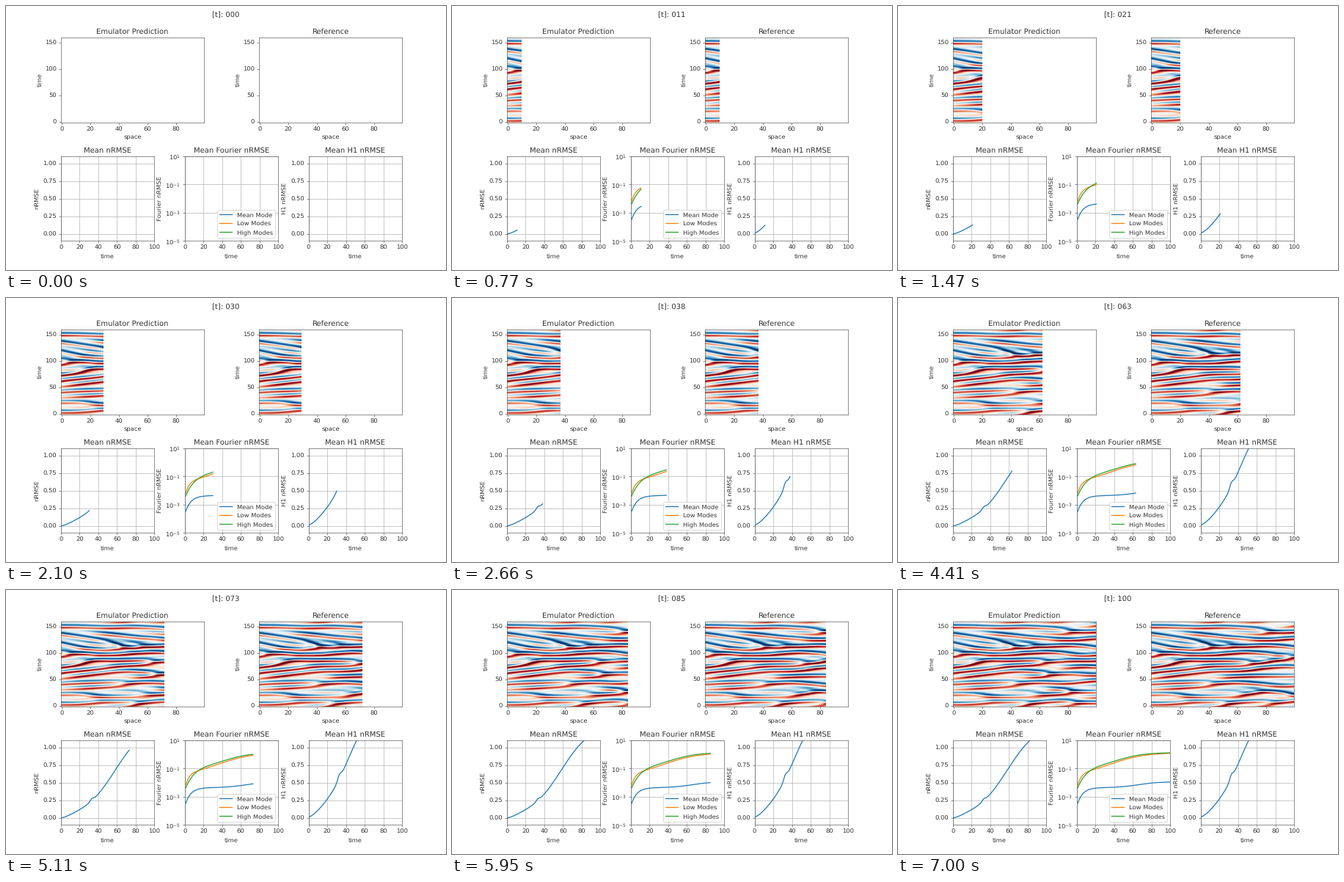
A matplotlib script that plays this animation: 600 by 360 pixels, repeating every 7.07 s.

```python
import numpy as np
import matplotlib.pyplot as plt
from matplotlib.animation import FuncAnimation

W, H = 600, 360
STEPS, POINTS = 100, 160
LENGTH, STEP_TIME = 106.6, 0.444    # flow domain, time per step
SUBSTEPS = 16
TOP, BOTTOM, HEIGHT = 43.2, 204.9, 115.5

plt.rcParams.update({
    "text.hinting": "no_hinting",
    "text.color": "0.2", "axes.labelcolor": "0.2", "axes.edgecolor": "0.35",
    "xtick.color": "0.35", "ytick.color": "0.35",
    "xtick.labelcolor": "0.2", "ytick.labelcolor": "0.2",
})


def evolve(u, steps, gain=1.0):
    """Kuramoto-Sivashinsky flow; one column per step."""
    k = 2 * np.pi * np.fft.rfftfreq(POINTS, LENGTH / POINTS)
    dt = STEP_TIME / SUBSTEPS
    implicit = 1 - dt * (k**2 - k**4)
    push = -0.5j * k * dt * gain * (k < 2 / 3 * k[-1])
    v = np.fft.rfft(u)
    field = np.empty((POINTS, steps))
    for step in range(steps):
        for _ in range(SUBSTEPS):
            v = (v + push * np.fft.rfft(u * u)) / implicit
            u = np.fft.irfft(v, POINTS)
        field[:, step] = u
    return field


def sigmoid(t, mid, width):
    return 1 / (1 + np.exp(-(t - mid) / width))


def error_curve(t, top, mid, width, first, bump):
    """Logistic growth from a given first value, with a bump at t = 33."""
    y = top * sigmoid(t, mid, width)
    y -= (y[0] - first) * np.exp(-(t / 14)**2)
    return y + bump * np.exp(-((t - 33) / 2.5)**2)


def mode_curve(t, top, rise, mid, width, drop, decay):
    """Fast start, then a slow rise, on a log scale."""
    return 10**(top - rise * sigmoid(-t, -mid, width)
                - drop * np.exp(-(t - 1) / decay))


def add_axes(x, y, w, title, xlabel, ylabel):
    ax = fig.add_axes([x / W, 1 - (y + HEIGHT) / H, w / W, HEIGHT / H])
    ax.set(title=title, xlabel=xlabel, ylabel=ylabel)
    return ax


def add_field(x, title, data):
    ax = add_axes(x, TOP, 195, title, "space", "time")
    image = ax.imshow(np.full_like(data, np.nan), cmap="RdBu_r",
                      vmin=-2.2, vmax=2.2, origin="lower", aspect="auto")
    return image, data


def add_plot(x, title, ylabel):
    ax = add_axes(x, BOTTOM, 127.4, title, "time", ylabel)
    ax.set(xlim=(0, STEPS), ylim=(-0.1, 1.1), xticks=range(0, 101, 20))
    ax.grid()
    return ax


def add_line(ax, t, y, label=None):
    line, = ax.plot([], [], label=label)
    return line, t, y


fig = plt.figure(figsize=(10, 6), dpi=60)
header = fig.suptitle("[t]: 000")

noise = np.random.default_rng(7).normal(size=POINTS)
start = evolve(noise - noise.mean(), 500)[:, -1]
scale = start.std()
fields = [
    add_field(75, "Emulator Prediction", evolve(start, STEPS, 1.015) / scale),
    add_field(345, "Reference", evolve(start, STEPS) / scale),
]

mean_ax = add_plot(75, "Mean nRMSE", "nRMSE")
fourier_ax = add_plot(243.8, "Mean Fourier nRMSE", "Fourier nRMSE")
h1_ax = add_plot(412.6, "Mean H1 nRMSE", "H1 nRMSE")
fourier_ax.set(yscale="log", ylim=(1e-5, 1e1))

t = np.arange(STEPS + 1)
modes = {
    "Mean Mode": (-1.94, 0.42, 66, 11, 1.11, 5.8),
    "Low Modes": (0.12, 1.6, 36.5, 18, 0.885, 4.2),
    "High Modes": (0.13, 1.0, 45, 14, 1.55, 9.7),
}
lines = [
    add_line(mean_ax, t, error_curve(t, 1.35, 58, 16.6, 0, 0.028)),
    add_line(h1_ax, t, error_curve(t, 1.7, 43, 14, 0.01, 0.06)),
]
lines += [add_line(fourier_ax, t[1:], mode_curve(t[1:], *shape), name)
          for name, shape in modes.items()]
fourier_ax.legend(loc="lower right")


def update(n):
    header.set_text(f"[t]: {n:03d}")
    for image, data in fields:
        shown = data.copy()
        shown[:, n:] = np.nan
        image.set_data(shown)
    for line, times, values in lines:
        seen = (times <= n) & (n > 0)
        line.set_data(times[seen], values[seen])
    return []


anim = FuncAnimation(fig, update, frames=STEPS + 1, interval=70,
                     init_func=lambda: update(0), repeat=True, repeat_delay=0)
plt.show()
```
